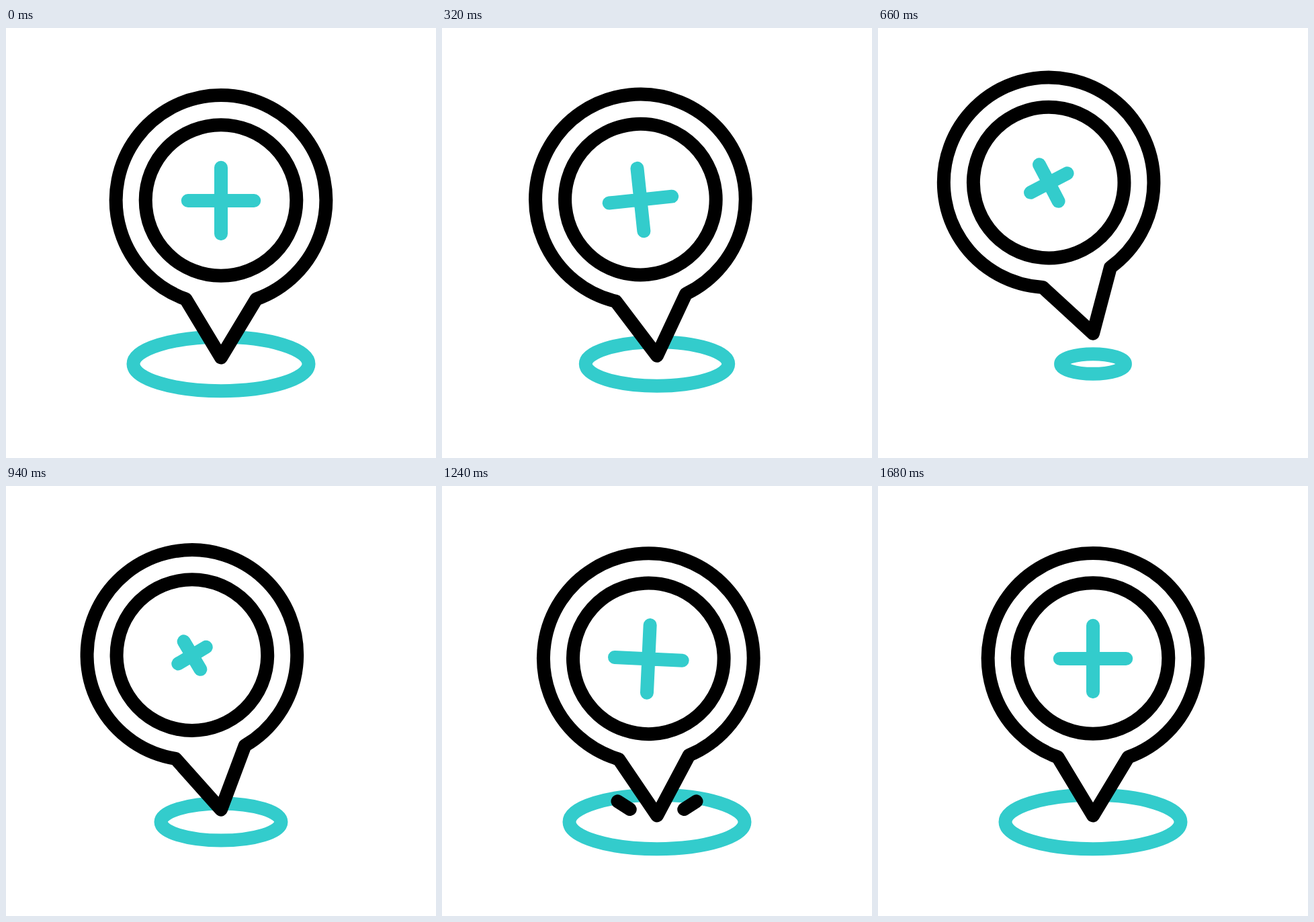
An HTML page for the animation above (3000 ms loop, 640x640 px).

```html
<!DOCTYPE html>
<html lang="en">
<head>
<meta charset="utf-8">
<title>Map pin</title>
<style>
  html, body { margin: 0; width: 100%; height: 100%; overflow: hidden; background: #fff; }
  svg { display: block; width: 100%; height: 100%; }
  svg * { stroke-width: 20; stroke-linecap: round; stroke-linejoin: round; }
  .black { stroke: #000; fill: #fff; }
  .teal { stroke: #33cccc; fill: none; }
</style>
</head>
<body>
<svg viewBox="0 0 640 640">
  <ellipse id="ring" class="teal" cx="320" cy="500"/>
  <g id="pin">
    <path class="black" d="M0 0L-52.5 -87A156.3 156.3 0 1 1 52.5 -87Z"/>
    <circle class="black" cy="-234" r="112.3"/>
    <path id="cross" class="teal"/>
  </g>
  <path id="sparks" class="black"/>
</svg>
<script>
const LOOP = 3000;
const LANDING = 1057, REST = 1620, HALF_SWING = 220;
const [ring, pin, cross, sparks] =
  ['ring', 'pin', 'cross', 'sparks'].map(id => document.getElementById(id));

const progress = (time, start, end) => Math.min(1, Math.max(0, (time - start) / (end - start)));
const smooth = u => u * u * (3 - 2 * u);
const ramp = (time, start, end) => smooth(progress(time, start, end));
const pulse = (time, start, peak, end) => ramp(time, start, peak) - ramp(time, peak, end);

// Leans back while rising, swings past upright on landing, then rocks to rest.
function tiltAt(time) {
  if (time < LANDING) return -18.5 * ramp(time, 0, 840) + 22.5 * ramp(time, 864, LANDING);
  const fade = 1 - progress(time, LANDING, REST) ** 2;
  return 4 * fade * Math.cos(Math.PI * (time - LANDING) / HALF_SWING);
}

// A slow take-off and an even fall.
function liftAt(time) {
  return 38 * (smooth(progress(time, 0, 707) ** 2.3) - ramp(time, 707, 1048));
}

function spark(side, tail, head) {
  const point = u => `${320 + side * (31 + 27.5 * u)} ${487 - 17.7 * u}`;
  return `M${point(tail)}L${point(head)}`;
}

function draw(time) {
  const radius = 130.5 - 95 * pulse(time, 67, 835, 1045) + 11.5 * pulse(time, 835, 1045, 1210);
  ring.setAttribute('rx', radius);
  ring.setAttribute('ry', radius * 0.308);

  pin.setAttribute('transform', `translate(320 ${490.5 - liftAt(time)}) rotate(${tiltAt(time)})`);

  const arm = 49.2 - 26 * pulse(time, 190, 922, 1110) + 6.4 * pulse(time, 922, 1110, 1290);
  const turn = -20.3 * pulse(time, 350, 930, 1180) + 6 * pulse(time, 930, 1180, 1690);
  cross.setAttribute('d', `M${-arm} 0H${arm}M0 ${-arm}V${arm}`);
  cross.setAttribute('transform', `translate(0 -233.5) rotate(${turn})`);

  const head = ramp(time, 1040, 1165), tail = ramp(time, 1140, 1400);
  sparks.setAttribute('d', spark(-1, tail, head) + spark(1, tail, head));
  sparks.style.display = time > 1045 && time < 1415 ? '' : 'none';
}

const start = performance.now();
function tick() {
  draw((performance.now() - start) % LOOP);
  requestAnimationFrame(tick);
}
tick();
</script>
</body>
</html>
```
